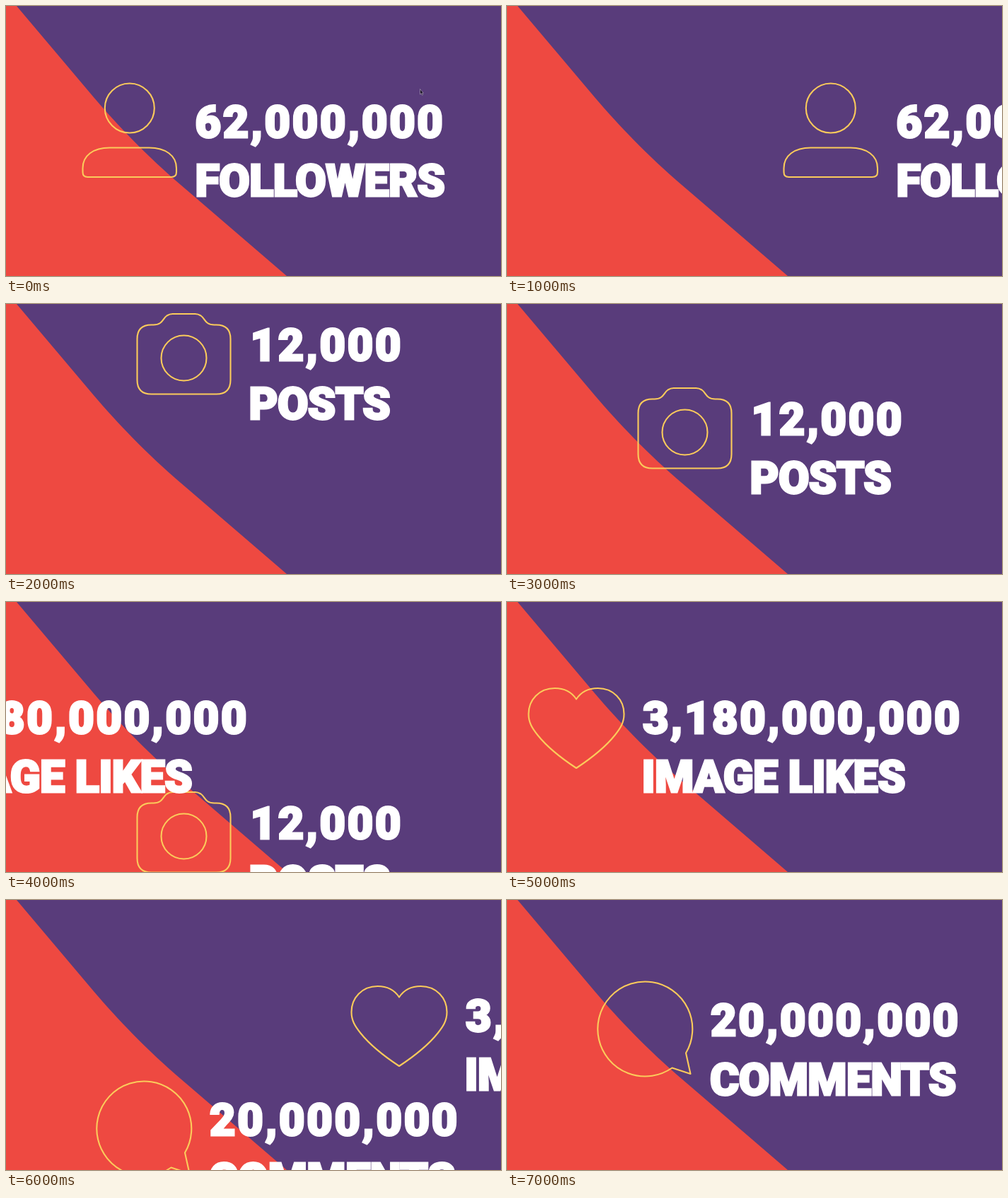
An HTML page for the animation above (8000 ms loop, 700x382 px).

```html
<!DOCTYPE html>
<html lang="en">
<head>
<meta charset="utf-8">
<title>Social media numbers</title>
<style>
  html, body { margin: 0; width: 100%; height: 100%; overflow: hidden; background: #593c7b; }
  svg { display: block; width: 100vw; height: 100vh; }
  .icon { fill: none; stroke: #fbcb5b; stroke-width: 2.1; stroke-linejoin: round; transform: translate(-.5px, -.5px); }
  text { fill: #fff; stroke: #fff; stroke-width: 3; font: 900 63px Roboto, sans-serif; }
  .number { letter-spacing: 2.7px; }
  .label { letter-spacing: -.6px; }
</style>
</head>
<body>
<svg viewBox="0 0 700 382">
  <rect width="700" height="382" fill="#593c7b"/>
  <path d="M0 0H15L118 122C150 160 190 203 240 247L397 382H0Z" fill="#ee4941"/>

  <g id="followers">
    <g class="icon">
      <circle cx="175.3" cy="145" r="35"/>
      <path d="M109 230C109 212 124 201 147 201H203C226 201 241.5 212 241.5 230V235.5Q241.5 242.5 234 242.5H116Q109 242.5 109 235.5Z"/>
    </g>
    <text class="number" x="267.5" y="185.5">62,000,000</text>
    <text class="label" x="267.5" y="268.5">FOLLOWERS</text>
  </g>

  <g id="posts">
    <g class="icon">
      <path d="M206 135H209C222 135 222 126 228 122Q232 119.5 236 119.5H268Q272 119.5 276 122C282 126 282 135 295 135H298Q318 135 318 155V213Q318 233 298 233H206Q186 233 186 213V155Q186 135 206 135Z"/>
      <circle cx="252" cy="182" r="32"/>
    </g>
    <text class="number" x="345.5" y="184.5">12,000</text>
    <text class="label" x="343.5" y="267.5">POSTS</text>
  </g>

  <g id="likes">
    <path class="icon" d="M98.5 138C92 128 82 122.5 68 122.5C46 122.5 31 139 31 159C31 171 36 179 44 189C56 204 78 222 98.5 235.5C119 222 141 204 153 189C161 179 166 171 166 159C166 139 151 122.5 129 122.5C115 122.5 105 128 98.5 138Z"/>
    <text class="number" x="192" y="185.5">3,180,000,000</text>
    <text class="label" x="190.5" y="268.5">IMAGE LIKES</text>
  </g>

  <g id="comments">
    <path class="icon" d="M253.5 217A67 67 0 1 0 234 238L260 246.5Z"/>
    <text class="number" x="288" y="191.5">20,000,000</text>
    <text class="label" x="287" y="275.5">COMMENTS</text>
  </g>

  <path id="cursor" d="M585.5 117.5V125L587.2 123.6L588.4 126.2L589.6 125.6L588.4 123.2H590.4Z" fill="#1c1626" stroke="#b9aec6" stroke-width=".6"/>
</svg>
<script>
  const BEATS = 8, BEAT = 1000;

  // Held positions: first beat, then one [dx, dy] per beat.
  const moves = {
    followers: [0, [0, 0], [283, 0]],
    posts: [2, [0, -105], [0, 0], [0, 150]],
    likes: [4, [-300, 0], [0, 0], [458, 0]],
    comments: [6, [0, 141], [0, 0]],
    cursor: [0, [0, 0]]
  };

  for (const [id, [first, ...spots]] of Object.entries(moves)) {
    const frames = Array.from({ length: BEATS + 1 }, (_, i) => {
      const spot = spots[i - first];
      const [x, y] = spot || [0, 0];
      return {
        offset: i / BEATS,
        easing: "step-end",
        transform: `translate(${x}px, ${y}px)`,
        visibility: spot ? "visible" : "hidden"
      };
    });
    document.getElementById(id).animate(frames, { duration: BEATS * BEAT, iterations: Infinity });
  }
</script>
</body>
</html>
```
